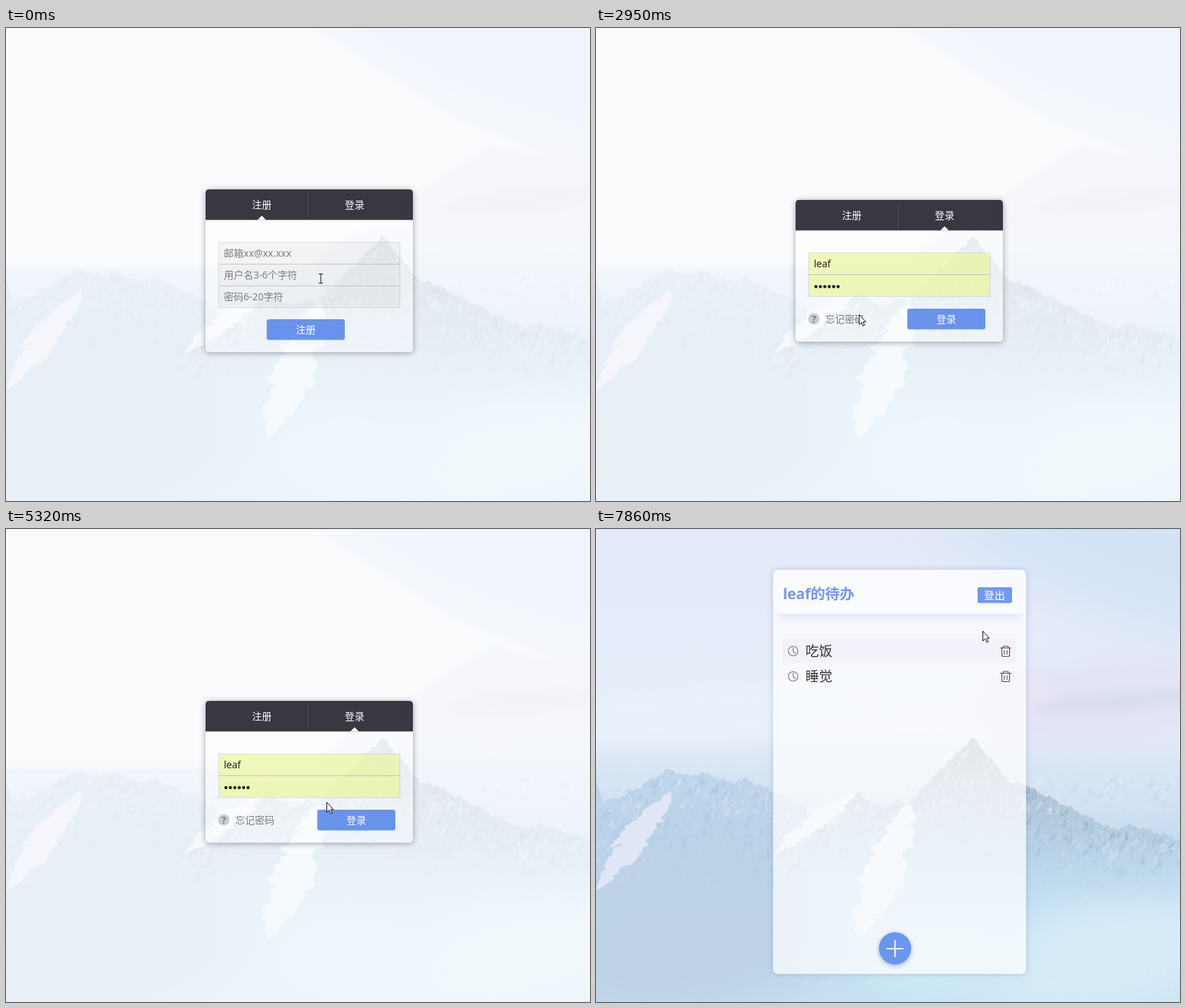
Write an HTML page with a canvas that moves like this. It is 831x674 px and loops after 8 s.

```html
<!DOCTYPE html>
<html lang="zh-CN">
<head>
<meta charset="utf-8">
<title>待办</title>
<style>
html, body { margin: 0; width: 100%; height: 100%; overflow: hidden; }
#stage { position: relative; width: 831px; height: 674px; overflow: hidden; }
canvas, svg, .scene { position: absolute; left: 0; top: 0; width: 831px; height: 674px; }
.card { position: absolute; background: rgba(255,255,255,.3); box-shadow: 0 1px 8px rgba(40,50,65,.45); }
#todo .card { background: rgba(255,255,255,.71); box-shadow: 0 0 8px rgba(110,135,180,.4); }
#todo .top { background: rgba(255,255,255,.3); box-shadow: 0 14px 12px -9px rgba(205,208,246,.55); }
text { font: 14px 'Noto Sans', 'Noto Sans CJK SC', 'Noto Sans CJK', sans-serif; fill: #7d7f81; }
.w { fill: #fff; }
.mid { text-anchor: middle; }
.bold { font-weight: 700; }
.title { font-size: 20.8px; fill: #7398ef; }
.task { font-size: 19.2px; fill: #333; }
.head { fill: rgba(27,27,37,.87); }
.field { fill: rgba(120,120,120,.07); stroke: rgba(110,120,130,.2); }
.btn { fill: #5d89eb; fill-opacity: .91; }
.line { fill: none; stroke: #4b4b50; stroke-width: 1.1; stroke-linecap: round; stroke-linejoin: round; }
#cursor path { stroke: #111; fill: #fff; stroke-linejoin: round; }
</style>
</head>
<body>
<div id="stage">
  <canvas id="bg" width="831" height="674"></canvas>
  <svg id="veil">
    <rect width="831" height="674" fill="#fff" opacity=".66"/>
    <path d="M-9-9H425L640 130 785 188 690 164 560 250 578 288H490L440 340H-9Z"
      fill="#fcfcfd" opacity=".85" style="filter:blur(3px)"/>
  </svg>
  <div id="scenes"></div>
  <svg>
    <g id="cursor">
      <path id="beam" d="M-3-6.500H3M0-6.500V6.500M-3 6.500H3"/>
      <path id="arrow" d="M.5.5V14.500L3.700 11.500 6 16.500 8.200 15.500 6 10.700H10Z"/>
      <path id="hand" d="M-1.500 10V1.500Q0-.5 1.500 1.500V6Q8.800 5 8.800 9V12.500L7.500 16.500H-.5L-4.200 11.500Q-4.500 8.500-1.500 11Z"/>
    </g>
  </svg>
</div>

<script>
const $ = id => document.getElementById(id);
const ctx = $('bg').getContext('2d');

// Interface
const text = (x, y, s, cls = '') => `<text x="${x}" y="${y}" class="${cls}">${s}</text>`;
const field = (x, y, w) => `<rect class="field" x="${x + .5}" y="${y + .5}" width="${w}" height="31"/>`;
const button = (x, y, w, label, id = '') =>
  `<rect class="btn" id="${id}" x="${x}" y="${y}" width="${w}" height="29.500" rx="3"/>` +
  text(x + w / 2, y + 20, label, 'w mid');
const card = (x, y, w, h, radius, cls = '') =>
  `<div class="card ${cls}" style="left:${x}px;top:${y}px;width:${w}px;height:${h}px;border-radius:${radius}"></div>`;
const scene = (id, cards, art) => `<div class="scene" id="${id}">${cards}<svg>${art}</svg></div>`;

const tabs = (y, active) => `
  <path class="head" d="M284 ${y + 43.5}v-38.500q0-5 5-5h285q5 0 5 5v38.500Z"/>
  <path d="M430 ${y + 4}v35" stroke="#4b4c56"/>
  <path class="w" d="M${active - 6} ${y + 43.5}l6-6 6 6Z"/>` +
  text(364, y + 27, '注册', 'w mid') + text(496, y + 27, '登录', 'w mid');

const task = (y, label) => `
  <g class="line" transform="translate(0 ${y})">
    <g stroke="#777"><circle cx="280.500" r="6.800"/><path d="M280.500-4.500V.5l3 2.500"/></g>
    <path d="M575.500-4.500h15M579.500-5v-2h7v2M577.500-4v9.500q0 2 2 2h7q2 0 2-2V-4M581-1v5.500M585-1v5.500"/>
  </g>` + text(298, y + 7, label, 'task');

const hints = ['邮箱xx@xx.xxx', '用户名3-6个字符', '密码6-20字符'];

$('scenes').innerHTML =
  scene('register', card(284, 230, 295, 232, '5px'),
    tabs(230, 364) +
    hints.map((s, i) => field(302, 305 + 31 * i, 258) + text(310, 326 + 31 * i, s)).join('') +
    button(371, 415, 111, '注册')) +
  scene('login', card(284, 245, 295, 202, '5px'),
    tabs(245, 496) + field(302, 320, 258) + field(302, 351, 258) +
    `<g id="empty">${text(310, 342, '用户名') + text(310, 373, '密码')}</g>
    <g id="filled">
      <path d="M303 321h257v30h-257zM303 352h257v30h-257z" fill="#effb9c" opacity=".66"/>
      <text x="310" y="341" style="fill:#222">leaf</text>
      <path d="M313 368.500h32" stroke="#1c1c1c" stroke-width="4.600" stroke-linecap="round" stroke-dasharray="0 6.300"/>
    </g>
    <circle cx="310" cy="414.500" r="8" fill="#c8cdd1"/>` +
    text(310, 419.5, '?', 'mid bold') + text(326, 420, '忘记密码') +
    button(443, 400, 111, '登录', 'enter')) +
  scene('reset', card(287, 272, 290, 148, '0 0 4px 4px'),
    '<rect class="head" x="287" y="272" width="290" height="43.500"/>' +
    text(300, 299, '重置密码', 'w bold') +
    field(300, 329, 263) + text(307, 351, '请输入邮箱') +
    button(300, 377, 111, '发送重置邮件') + button(418, 377, 83, '返回登录')) +
  scene('todo', card(252, 58, 360, 576, '7px') + card(252, 58, 360, 63, '7px 7px 0 0', 'top'),
    text(266, 100, 'leaf的待办', 'bold title') +
    `<rect x="543" y="83" width="49" height="22.500" rx="2" fill="#7299ef"/>
    <rect x="265" y="156" width="333" height="35" rx="2" fill="#f3f2fb"/>
    <text class="w mid" x="567" y="100" style="font-size:15px">登出</text>` +
    task(174, '吃饭') + task(210, '睡觉') +
    `<circle cx="425.500" cy="597.500" r="23" fill="#6996ef" style="filter:drop-shadow(0 2px 3px rgba(80,110,180,.5))"/>
    <path d="M413.500 598h24M425.500 586v24" stroke="#fff" stroke-width="2"/>`);

// Backdrop
let seed = 11;
const rnd = () => (seed = seed * 16807 % 2147483647) / 2147483647;
const wobble = x => 1.6 * Math.sin(x * .23) + 1.3 * Math.sin(x * .61 + 1) + Math.sin(x * 1.37 + 2);

function fade(y0, y1, ...colors) {
  const g = ctx.createLinearGradient(0, y0, 0, y1);
  colors.forEach((c, i) => g.addColorStop(i / (colors.length - 1), c));
  return g;
}

function cloud(x, y, rx, ry, tilt, color) {
  ctx.filter = `blur(${Math.min(rx, ry) / 3}px)`;
  ctx.fillStyle = color;
  ctx.beginPath();
  ctx.ellipse(x, y, rx, ry, tilt, 0, 7);
  ctx.fill();
  ctx.filter = 'none';
}

// Each peak is [x, y, left slope, right slope]; the skyline is their upper hull
const skyline = peaks => x => wobble(x) +
  Math.min(...peaks.map(([px, py, l, r]) => py + (x < px ? (px - x) * l : (x - px) * r)));

function range(peaks, x0, x1, bottom, colors, crags, light, dark) {
  const top = skyline(peaks);
  ctx.beginPath();
  ctx.moveTo(x0, bottom);
  for (let x = x0; x <= x1; x += 2) ctx.lineTo(x, top(x));
  ctx.lineTo(x1, bottom);
  ctx.fillStyle = fade(Math.min(...peaks.map(p => p[1])), bottom, ...colors);
  ctx.fill();
  for (let i = 0; i < crags; i++) {
    const x = x0 + rnd() * (x1 - x0), d = rnd() ** 1.4, y0 = top(x);
    const y = y0 + 2 + d * (bottom - y0) * .75;
    const h = 4 + rnd() * 14, lean = (rnd() - .6) * h * 1.8;
    ctx.globalAlpha = (1 - d) * .5 * rnd();
    ctx.fillStyle = rnd() < .55 ? light : dark;
    ctx.beginPath();
    ctx.moveTo(x, y);
    ctx.lineTo(x + lean, y + h);
    ctx.lineTo(x + lean * .3 + 3, y + h * .8);
    ctx.fill();
  }
  ctx.globalAlpha = 1;
}

// Ragged tongue of snow between two points
function snow(x0, y0, x1, y1, width, color) {
  const edge = side => Array.from({ length: 31 }, (_, i) => {
    const k = i / 30, w = side * width * Math.sin(Math.PI * k) ** .7 * (.3 + .4 * rnd());
    return [x0 + (x1 - x0) * k + w, y0 + (y1 - y0) * k + w * .3];
  });
  ctx.fillStyle = color;
  ctx.fill(new Path2D('M' + [...edge(-1), ...edge(1).reverse()].join('L') + 'Z'));
}

function paintBackdrop() {
  ctx.fillStyle = fade(0, 674, '#e5eafa', '#e6ebfa', '#e6eefa', '#e7edf9', '#cbe0f1', '#c0dcef', '#c3e0f1', '#c8e2f2');
  ctx.fillRect(0, 0, 831, 674);
  cloud(760, 20, 330, 105, .35, '#d3e3f6');
  cloud(160, 265, 250, 40, -.05, '#e8f1fb');
  cloud(740, 245, 190, 62, -.1, '#e2e3f4');
  cloud(600, 240, 50, 32, 0, '#ebe5f5');
  cloud(740, 246, 120, 14, -.08, '#d9deef');

  range([[60, 354, .1, .05], [300, 352, .05, .05], [655, 345, .2, .2], [745, 344, .2, .2], [831, 346, .2, 0]],
    -4, 836, 460, ['#d9e5f4', '#cfe1f2', 'rgba(195,221,239,0)'], 700, '#eaf0fa', '#b9d2e9');
  range([[-2, 352, 0, 3], [102, 343, .6, .3], [150, 347, .3, .35], [212, 356, .2, .45]],
    -4, 300, 590, ['#c0d5eb', '#bbd2e8', '#bcd4e8', 'rgba(190,211,230,0)'], 900, '#e0e8f7', '#a5c2de');
  cloud(110, 600, 210, 100, -.1, '#bdd2e5');
  cloud(720, 610, 190, 85, -.2, '#d5eaf7');
  cloud(490, 610, 110, 60, 0, '#cde8f5');
  range([[536, 297, 1, 1.2], [368, 374, .65, .6], [430, 387, .4, .4], [600, 360, .8, .5], [762, 422, .2, .3]],
    248, 836, 540, ['#a3b0bd', '#b1c5d8', '#b7d2e7', 'rgba(192,221,240,0)'], 1500, '#e3ebf4', '#91aac2');

  snow(108, 374, 0, 515, 32, '#e0e6f6');
  snow(82, 400, 20, 455, 16, '#dfe6f6');
  snow(370, 375, 255, 462, 26, '#e5eef8');
  snow(447, 392, 372, 585, 52, '#e4f0f8');

  // Spray over the valley
  ctx.fillStyle = '#eef6fc';
  for (let i = 0; i < 500; i++) {
    ctx.globalAlpha = rnd() * .6;
    ctx.fillRect(831 - 360 * rnd() * rnd(), 674 - 180 * rnd(), 1 + rnd() * 2, 1);
  }
  ctx.globalAlpha = 1;
}

// Pointer legs: start, number of steps, destination, ease-out power
const STEP = 136;
const legs = [
  [1150, 4, 497, 255, 1.4], [2680, 4, 369, 414, 2.4], [3690, 3, 456, 389, 1.2],
  [5470, 4, 496, 411, 1.6], [7590, 3, 550, 145, 1.2]
];

function pointer(t) {
  let x = 448, y = 357;
  for (const [start, steps, toX, toY, power] of legs) {
    if (t < start) break;
    const k = Math.min(1, (Math.floor((t - start) / STEP + .1) + 1) / steps);
    const e = 1 - (1 - k) ** power;
    x += (toX - x) * e;
    y += (toY - y) * e;
  }
  return [Math.round(x), Math.round(y)];
}

const within = (t, ...spans) => spans.some(([a, b]) => t >= a && t < b);
const show = (id, on) => $(id).style.display = on ? '' : 'none';

function draw(t) {
  const current = t < 2220 ? 'register' : t >= 7030 ? 'todo' : within(t, [3380, 5200]) ? 'reset' : 'login';
  for (const id of ['register', 'login', 'reset', 'todo']) show(id, id === current);
  show('veil', current !== 'todo');

  const filled = within(t, [2530, 3380], [5320, 7030]);
  show('filled', filled);
  show('empty', !filled);
  $('enter').setAttribute('stroke', t >= 6350 ? '#6a93e9' : 'none');

  const kind = t < 1150 ? 'beam' : within(t, [1420, 2680], [3100, 3380], [3810, 5050]) ? 'hand' : 'arrow';
  for (const id of ['beam', 'arrow', 'hand']) show(id, id === kind);
  $('cursor').setAttribute('transform', `translate(${pointer(t)})`);
}

paintBackdrop();
const start = performance.now();
(function tick() {
  draw((performance.now() - start) % 8000);
  requestAnimationFrame(tick);
})();
</script>
</body>
</html>
```
